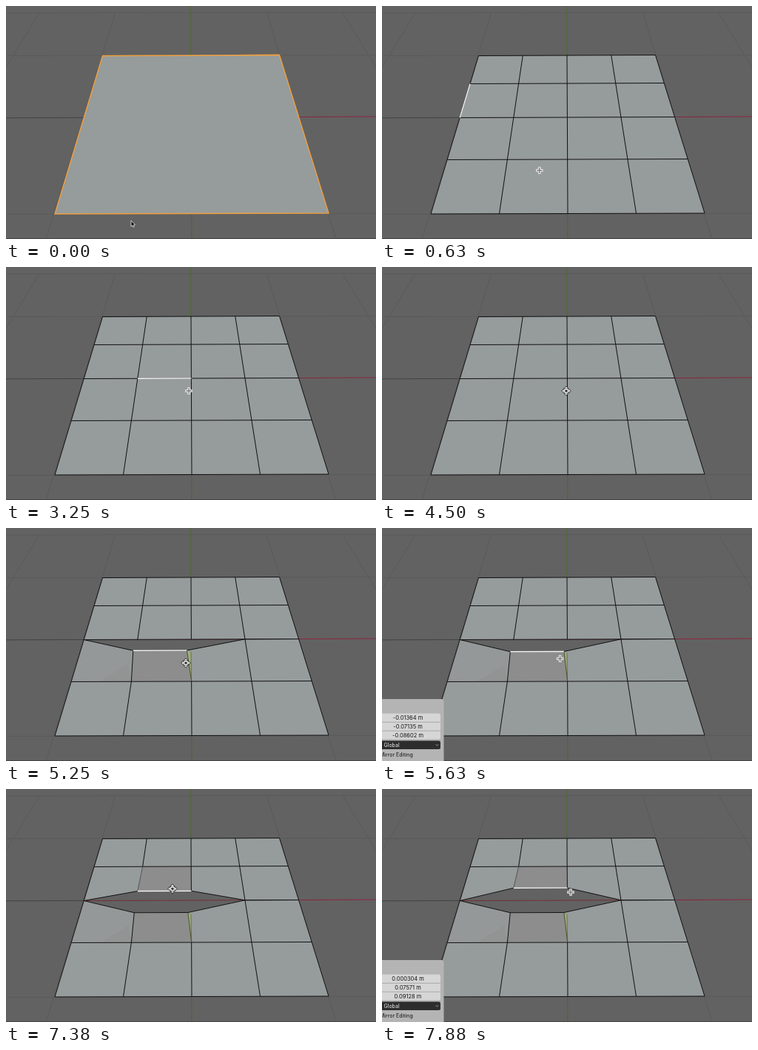
These frames come from a looping animation (500 px wide and 316 px high, 8 s). An HTML page with a canvas:

```html
<!DOCTYPE html>
<html lang="en">
<head>
<meta charset="utf-8">
<title>Ripping edges in a mesh</title>
<style>
html, body { margin: 0; width: 100%; height: 100%; overflow: hidden; background: #626262; }
canvas { display: block; width: 500px; height: 316px; }
</style>
</head>
<body>
<canvas id="view" width="500" height="316"></canvas>
<script>
const ctx = document.getElementById('view').getContext('2d');
const LOOP = 8000, STEP = 125;
const ROWS = [67.5, 105.5, 151.5, 208.5, 282];
const BLACK = '#111', WHITE = '#f2f2f2', FACE = '#969b9b', SHADED = '#8e8d8d';

// Pointer path: step, x, y
const PATH = [
  [0, 169, 291], [2, 178, 280], [7, 236, 185], [8, 234, 186], [11, 222, 154], [14, 246, 168],
  [16, 249, 170], [22, 250, 170], [26, 247, 168], [27, 247, 168], [31, 249, 168],
  [36, 249, 168], [42, 243, 183], [44, 244.5, 184.5], [49, 225, 148],
  [56, 225, 148], [60, 225, 131], [62, 226, 131], [63, 255, 140]
];

const lerp = (a, b, t) => a + (b - a) * t;
const add = (p, q) => [p[0] + q[0], p[1] + q[1]];

function pointerAt(k) {
  const i = PATH.findIndex(p => p[0] >= k);
  if (i < 1) return PATH[i < 0 ? PATH.length - 1 : 0].slice(1);
  const a = PATH[i - 1], b = PATH[i], t = (k - a[0]) / (b[0] - a[0]);
  return [lerp(a[1], b[1], t), lerp(a[2], b[2], t)];
}

function vert(c, r) {
  const t = (ROWS[r] - ROWS[0]) / (ROWS[4] - ROWS[0]);
  return [lerp(130.5 + c * 59.75, 66 + c * 92.5, t), ROWS[r] - c * 0.25];
}

function trace(pts) {
  ctx.beginPath();
  pts.forEach(p => ctx.lineTo(p[0], p[1]));
}

function line(color, width, ...pts) {
  trace(pts);
  ctx.strokeStyle = color;
  ctx.lineWidth = width;
  ctx.stroke();
}

function fill(color, ...pts) {
  trace(pts);
  ctx.fillStyle = color;
  ctx.fill();
}

function drawFloor() {
  ctx.fillStyle = '#626262';
  ctx.fillRect(0, 0, 500, 316);
  const grid = '#5a5a5a';
  for (const y of [9, 67, 282]) line(grid, 1, [0, y + 0.5], [500, y - 0.5]);
  for (const m of [-2, -1, 1, 2]) {
    const x = y => 250 + m * 0.3047 * (y + 327);
    line(grid, 1, [x(9), 9], [x(316), 316]);
  }
  line('#414141', 1, [0, 151.8], [106, 151.4]);
  line('#743038', 1, vert(0, 2), vert(3, 2));
  line('#8c2540', 1.2, [396, 150.5], [500, 150]);
  line('#47702a', 1.1, [250, 0], [250, 67]);
  line('#4c6139', 1, [250.8, 281], [251, 316]);
  line('#454545', 1, [0, 315.5], [500, 315.5]);
}

function drawMesh(front, back, selected) {
  const ripped = front[1] > 0.5, lifted = back[1] < -0.5;
  const top = [0, 1, 2, 3, 4].map(c => vert(c, 2));
  const low = top.slice();
  for (const c of [1, 2]) {
    low[c] = add(top[c], front);
    top[c] = add(top[c], back);
  }

  fill(FACE, vert(0, 0), vert(4, 0), ...top.slice().reverse());
  fill(FACE, ...low, vert(4, 4), vert(0, 4));
  if (ripped) {
    fill('#949898', low[0], low[1], vert(1, 3), vert(0, 3));
    fill('#929393', add(low[1], [-8, 18]), vert(1, 3), add(vert(0, 3), [40, 0]));
    fill(SHADED, low[1], low[2], vert(2, 3), vert(1, 3));
    fill('#a2aa84', low[2], [250, low[2][1] + 3], vert(2, 3));
    line('#5d7c3a', 1, [250, low[2][1] + 2], vert(2, 3));
  }
  if (lifted) fill(SHADED, vert(1, 1), vert(2, 1), top[2], top[1]);

  for (const r of [0, 1, 3, 4]) line(BLACK, 1, vert(0, r), vert(4, r));
  for (const c of [0, 1, 2, 3, 4]) {
    line(BLACK, 1, vert(c, 0), vert(c, 1));
    line(lifted && c === 1 ? '#555' : BLACK, 1, vert(c, 1), top[c]);
    line(ripped && c === 2 ? '#47502f' : BLACK, 1, low[c], vert(c, 3));
    line(BLACK, 1, vert(c, 3), vert(c, 4));
  }
  line(BLACK, 1, ...top);
  if (ripped) line(BLACK, 1, ...low);

  if (selected === 'side') line(WHITE, 1.4, vert(0, 1), vert(0, 2));
  if (selected === 'front') line(WHITE, 1.5, low[1], low[2]);
  if (selected === 'back') line(WHITE, 1.5, top[1], top[2]);
}

function drawObject() {
  const corners = [vert(0, 0), vert(4, 0), vert(4, 4), vert(0, 4)];
  fill(FACE, ...corners);
  line('#f0a03e', 1.4, ...corners, corners[0], corners[1]);
}

function box(x, y, w, h, r, color) {
  ctx.beginPath();
  ctx.roundRect(x, y, w, h, r);
  ctx.fillStyle = color;
  ctx.fill();
}

function label(text, x, y, size, color, align) {
  ctx.font = size + 'px Inter, "DejaVu Sans", sans-serif';
  ctx.textAlign = align;
  ctx.textBaseline = 'middle';
  ctx.fillStyle = color;
  ctx.fillText(text, x, y);
}

function drawPanel(values) {
  box(-8, 232, 91.5, 90, 3, '#b4b4b4');
  box(-8, 251.5, 87, 35, 2.5, '#d6d6d6');
  values.forEach((v, i) => {
    if (i) line('#a8a8a8', 1, [0, 251.5 + i * 11.8], [79, 251.5 + i * 11.8]);
    label(v + ' m', 35, 257.7 + i * 11.8, 7.5, '#111', 'center');
  });
  box(-8, 288.5, 87, 11.5, 2.5, '#2d2d2d');
  label('Global', 2.5, 294.5, 7, '#eee', 'left');
  line('#aaa', 0.8, [72.5, 293.3], [74.5, 295.3], [76.5, 293.3]);
  label('Mirror Editing', -3, 307.5, 7, '#111', 'left');
}

function drawArrow() {
  const tip = [[0, 0], [0, 8], [1.8, 6.5], [3, 9], [4.3, 8.4], [3.2, 6], [5.5, 5.7], [0, 0]];
  fill('#111', ...tip);
  line('#eee', 0.8, ...tip);
}

function drawCross() {
  for (const [w, s, color] of [[3.4, 4.7, '#f4f4f4'], [1.2, 3.7, '#6a6a6a']]) {
    line(color, w, [-s, 0], [s, 0]);
    line(color, w, [0, -s], [0, s]);
  }
}

function drawMove() {
  for (let i = 0; i < 4; i++) {
    const head = [[-2.3, -3.4], [0, -5.8], [2.3, -3.4], [-2.3, -3.4]];
    line('#222', 1.4, ...head);
    fill('#fff', ...head);
    ctx.rotate(Math.PI / 2);
  }
  ctx.beginPath();
  ctx.arc(0, 0, 2.4, 0, 7);
  ctx.fillStyle = '#333';
  ctx.fill();
  ctx.strokeStyle = '#fff';
  ctx.lineWidth = 1.1;
  ctx.stroke();
}

function render(ms) {
  const k = Math.floor((ms + 5) / STEP) % (LOOP / STEP);
  const pointer = pointerAt(k);
  const editing = k >= 3;
  const moving = (k >= 34 && k < 44) || (k >= 56 && k < 61);

  drawFloor();
  if (editing) {
    const p = pointerAt(Math.min(k, 44)), q = pointerAt(Math.min(k, 60));
    const front = k < 36 ? [0, 0] : [p[0] - 249, p[1] - 168];
    const back = k < 56 ? [0, 0] : [0, q[1] - 148];
    let selected = 'side';
    if (k >= 16) selected = 'front';
    if (k >= 34 && k <= 36) selected = '';
    if (k >= 50) selected = 'back';
    drawMesh(front, back, selected);
  } else {
    drawObject();
  }

  if (k >= 45 && k < 50) drawPanel(['-0.01364 m'.slice(0, -2), '-0.07135', '-0.08602']);
  if (k >= 61) drawPanel(['0.000304', '0.07571', '0.09128']);

  ctx.save();
  ctx.translate(...pointer);
  (moving ? drawMove : editing ? drawCross : drawArrow)();
  ctx.restore();
}

function tick() {
  render(performance.now() % LOOP);
  requestAnimationFrame(tick);
}
tick();
</script>
</body>
</html>
```
